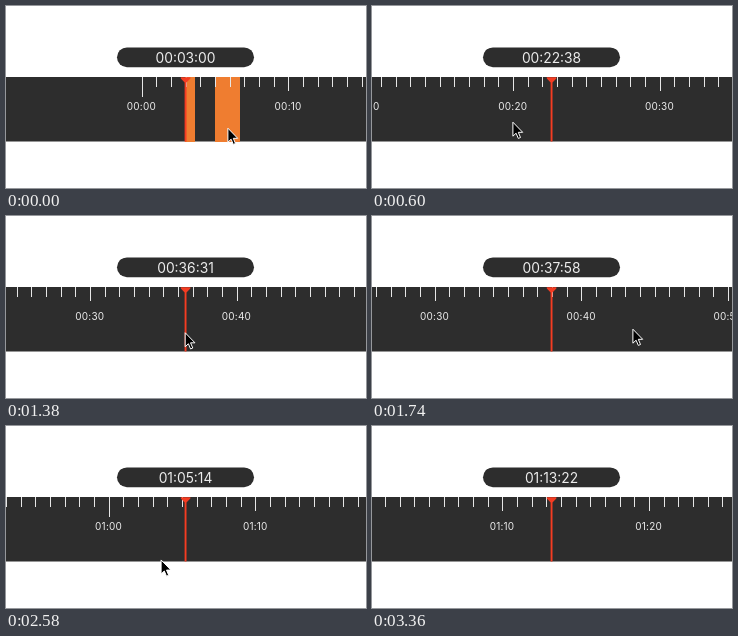
Animation, 360 px wide and 182 px high, one loop 3420 ms. Source, as an HTML page:

```html
<!DOCTYPE html>
<html lang="en">
<head>
<meta charset="utf-8">
<title>Timeline scrubber</title>
<style>
  html, body { margin: 0; width: 100%; height: 100%; overflow: hidden; background: #fff; }
  svg { display: block; width: 360px; height: 182px; }
  text { font-family: Inter, Roboto, sans-serif; fill: #ececec; text-anchor: middle; }
  #clock { font-size: 13.8px; }
  #ruler text { font-size: 10px; letter-spacing: .2px; }
  #ruler rect { shape-rendering: crispEdges; }
</style>
</head>
<body>
<svg viewBox="0 0 360 182">
  <rect x="111" y="41.4" width="137" height="19.8" rx="9.9" fill="#2d2d2d"/>
  <text id="clock" x="179.5" y="56.5"></text>
  <rect y="71" width="360" height="64.5" fill="#2d2d2d"/>
  <g id="ruler"></g>
  <path d="M174.8 71.3h9.6v1.2l-3.9 4V135.5h-1.9V76.5l-3.8-4z" fill="#f43c22"/>
  <path id="cursor" d="M.9 1.2V15.2L4.1 12.2L6.3 17.4L8.5 16.5L6.3 11.3H10.7Z"
        fill="#000" stroke="#fff" stroke-linejoin="round"/>
</svg>
<script>
const LOOP = 3420, STEP = 60, FPS = 60;
const PX = 14.667 / FPS;   // pixels per timecode frame
const HEAD = 180.2;

const ruler = document.getElementById('ruler');
const clock = document.getElementById('clock');
const cursor = document.getElementById('cursor');

// Each flick: an accelerating drag, then an exponential glide.
const flicks = [
  { start: 140, release: 342.3, from: 180.5, dist: 331, power: 2.7,
    at: 600, end: 2341.28, amp: 982.78, tau: 414.5 },
  { start: 1880, release: 2091.2, from: 2278.5, dist: 450, power: 1.88,
    at: 2280, end: 4503.81, amp: 1159.31, tau: 443.1 }
];

const clamp = v => Math.max(0, Math.min(1, v));
const mix = (a, b, u) => a + (b - a) * u;
const smooth = u => u * u * (3 - 2 * u);
const pad = n => String(n).padStart(2, '0');
const progress = (t, a, b) => clamp((t - a) / (b - a));
const dragged = (f, t) => progress(t, f.start, f.release) ** f.power;

function add(name, attrs, text = '') {
  const el = document.createElementNS('http://www.w3.org/2000/svg', name);
  for (const key in attrs) el.setAttribute(key, attrs[key]);
  el.textContent = text;
  ruler.append(el);
}

function buildRuler() {
  for (const [a, b] of [[177, 217], [298, 401]])
    add('rect', { x: a * PX, y: 71, width: (b - a) * PX, height: 64.5, fill: '#ef7d30' });
  for (let s = 0; s <= 90; s++) {
    const x = s * FPS * PX;
    const height = s % 60 === 0 ? 20 : s % 10 === 0 ? 14 : 10;
    add('rect', { x: x - .5, y: 71, width: 1, height, fill: '#e6e6e6' });
    if (s % 10 === 0)
      add('text', { x: x - .7, y: 104 }, pad(Math.floor(s / 60)) + ':' + pad(s % 60));
  }
}

function position(t) {
  const f = flicks[t < 1880 ? 0 : 1];
  return t < f.release
    ? f.from + f.dist * dragged(f, t)
    : f.end - f.amp * Math.exp((f.at - t) / f.tau);
}

function cursorAt(t) {
  if (t <= 1020) {
    const u = dragged(flicks[0], t);
    return [mix(221, 140, u), mix(121, 115, u)];
  }
  if (t < 1200) {
    const u = smooth(progress(t, 1020, 1200));
    return [mix(140, 144, u), mix(115, 117, u)];
  }
  if (t < 1880) {
    const u = smooth(progress(t, 1200, 1700));
    return [mix(144, 260, u), mix(117, 112, u)];
  }
  const u = progress(t, 2430, 2780) ** 1.5;
  return [mix(260, 150, dragged(flicks[1], t)) + 15 * u, mix(112, 186, u)];
}

function hold(t) {
  if (t < 180) return 0;
  if (t >= 1740 && t < 1920) return 1740;
  return Math.floor(t / STEP) * STEP;
}

function draw(ms) {
  const t = hold(ms % LOOP);
  const pos = position(t);
  const n = Math.floor(pos);
  const secs = Math.floor(n / FPS);
  clock.textContent = [Math.floor(secs / 60), secs % 60, n % FPS].map(pad).join(':');
  ruler.setAttribute('transform', `translate(${HEAD - pos * PX} 0)`);
  cursor.setAttribute('transform', `translate(${cursorAt(t)})`);
}

buildRuler();
const begin = performance.now();
(function tick() {
  draw(performance.now() - begin);
  requestAnimationFrame(tick);
})();
</script>
</body>
</html>
```
